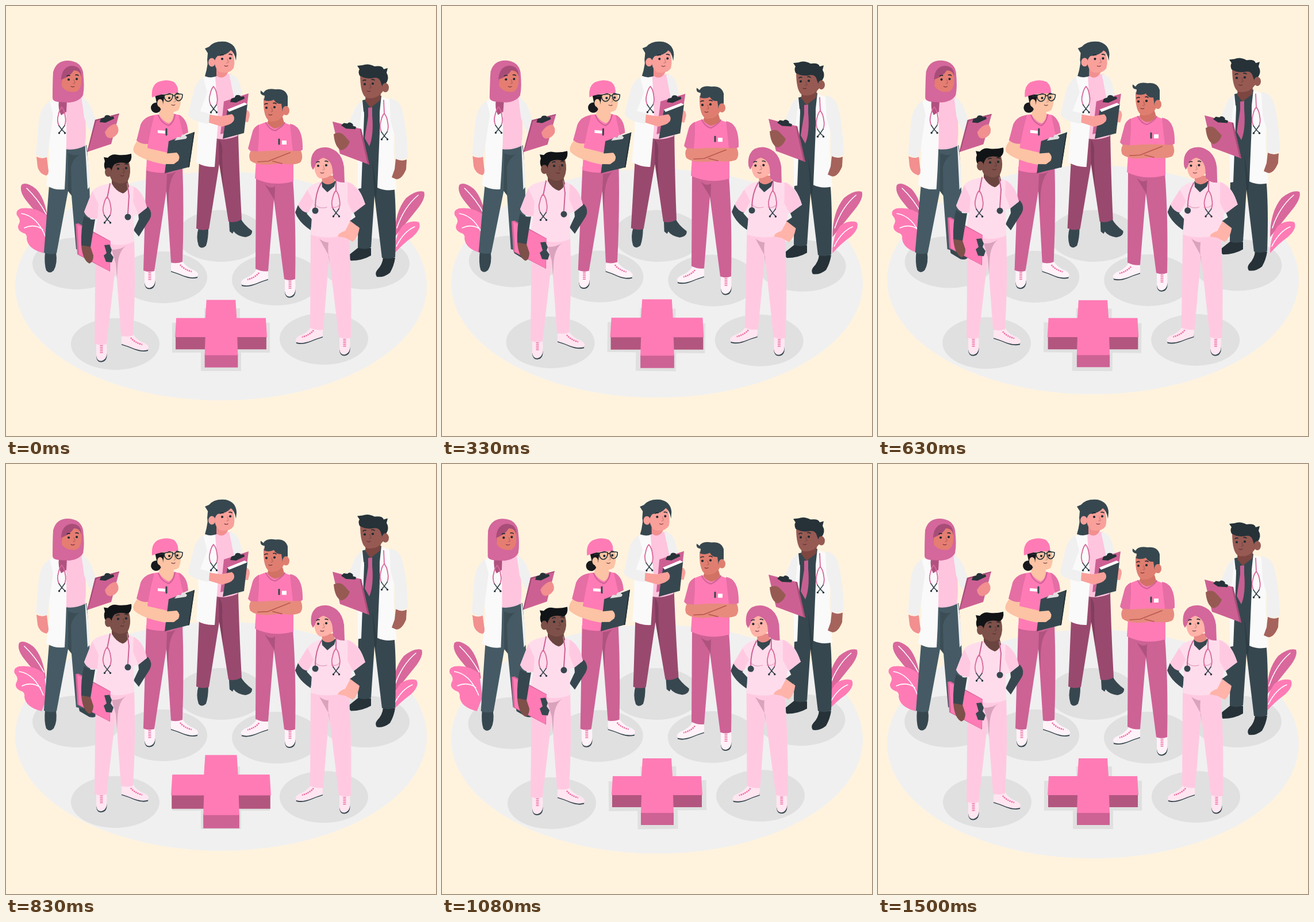
Animation of 748x748 px, one loop 1540 ms. Source, as an HTML page:

```html
<!DOCTYPE html>
<html lang="en">
<head>
<meta charset="utf-8">
<title>Medical team</title>
<style>
html, body { margin: 0; width: 100%; height: 100%; overflow: hidden; background: #fff3de; }
svg { display: block; width: 100vw; height: 100vh; }
.line { fill: none; stroke-linecap: round; stroke-linejoin: round; }
.shade { fill: #000; opacity: .15; }
</style>
</head>
<body>
<svg viewBox="0 0 748 748">
<defs>
  <g id="face">
    <g fill="#1f2a30"><circle cx="-7" r="2.1"/><circle cx="7" cy="-1" r="2.1"/></g>
    <path class="line" stroke="#1f2a30" stroke-width="1.6" d="M-10-6Q-8-8-5-7M5-8Q8-9 10-7"/>
    <path class="line" stroke="#000" stroke-opacity=".17" stroke-width="1.5" d="M2 0L4 6 1 7"/>
    <path class="line" stroke="#5b2530" stroke-width="1" d="M-3 12Q0 14 3 12"/>
  </g>
  <g id="shoeDown">
    <path fill="#37474f" d="M-8 20L9 19Q10 22 9 27Q7 34 0 34.5Q-8 35-9 25Z"/>
    <path d="M-9 0H9Q10 12 9 23Q7 31 0 32.5Q-8 33-9 23Z"/>
    <path fill="none" stroke="#ed6fa4" stroke-width="5" stroke-dasharray="1.5 1.5" d="M0 2V19"/>
  </g>
  <g id="shoeSide">
    <path fill="#37474f" d="M0 10V14.5Q12 18 22 22.5Q36 28 46 25L46.500 19Z"/>
    <path d="M0 0L20-4Q27 7 41 12Q50 17 46 23Q36 26 22 21Q10 16 0 13Z"/>
    <path fill="none" stroke="#ed6fa4" stroke-width="2.500" stroke-dasharray="2.5 1.2" d="M16 2Q22 10 36 14"/>
  </g>
  <path id="clip" fill="#263238" d="M-12 5L-10-1-4-3Q-3-8 3-7 7-6 6-4L12-5 13-1-2 6Z"/>
  <g id="scope" class="line">
    <path stroke="#d9689c" stroke-width="1.8" d="M-5 0Q-9-9-6-18Q-4-28 0-32Q5-26 6-16Q8-8 5 0"/>
    <path stroke="#37474f" stroke-width="1.6" d="M-5 0L0 7 5 0M0 7L-4 12M0 7L5 12"/>
    <g fill="#263238"><circle cx="-4.5" cy="13" r="1.7"/><circle cx="5.5" cy="13" r="1.7"/></g>
  </g>
</defs>

<rect width="748" height="748" fill="#fff3de"/>
<g data-move="float"><ellipse cx="374" cy="487" rx="358" ry="199" fill="#f0f0f0"/></g>

<g data-move="wind" data-pivot="374 495" fill="#e0e0e0">
  <g id="spots"></g>
  <path d="M345 526H407V551H459V603H409V635H339V603H289V551H345Z"/>
</g>

<g data-move="shake">
  <path fill="#d9689c" d="M73 372Q68 334 52 318Q35 305 27 311Q22 323 38 342Q52 360 70 376Z"/>
  <path fill="#ff7bb5" d="M70 364Q50 349 27 352Q16 355 19 364Q26 372 23 378Q16 390 33 396Q37 399 36 405Q38 423 66 430L76 405Z"/>
  <path class="line" stroke="#fff" stroke-width="1.6" d="M36 317Q56 336 70 362M27 361Q54 365 69 402M32 386Q50 378 64 389"/>
</g>
<g data-move="shake">
  <path fill="#d9689c" d="M676 402Q676 358 696 334Q714 319 727 323Q731 332 718 350Q702 370 676 402Z"/>
  <path fill="#ff7bb5" d="M676 430Q676 400 690 382Q704 372 718 376Q724 386 708 401Q690 414 676 430Z"/>
  <path class="line" stroke="#fff" stroke-width="1.6" d="M717 329Q692 350 680 386M711 384Q692 392 679 418"/>
</g>

<!-- doctor with headscarf -->
<g data-move="wind" data-pivot="125 280">
  <path fill="#37474f" d="M68 428L87 428Q90 448 83 460Q76 467 70 460Q66 448 68 428ZM126 420L147 418 160 434Q157 443 145 440L128 430Z"/>
  <path fill="#455a64" d="M102 247L140 242Q147 300 147 420Q134 427 122 423L114 330 108 322 88 430Q76 434 66 429L72 350 76 300Z"/>
  <path class="shade" d="M108 256Q120 262 128 258Q116 266 113 280L114 328 108 322Z"/>
  <path fill="#ffc4de" d="M98 158L134 158Q141 200 138 243Q120 252 103 249Z"/>
  <path fill="#f0f0f0" d="M131 158Q143 164 149 178L158 203 171 211 164 229Q150 224 143 212L136 194ZM137 232Q146 280 146 314L142 319Z"/>
  <path fill="#fafafa" d="M84 162Q72 166 68 180L76 260 70 312Q84 321 102 319Q106 250 105 190L96 162Z"/>
  <path fill="#f0f0f0" d="M76 166Q61 174 57 200L52 258Q60 266 72 263L77 225 82 190Z"/>
  <path fill="#f28f8f" d="M53 262Q62 267 71 263L73 280Q76 293 70 295Q58 292 55 280Z"/>
  <path fill="#b0527f" d="M92 164H106L105 184 96 190Q90 180 92 164Z"/>
  <path fill="#d4679b" d="M81 160Q81 130 82 115Q87 95 108 95Q130 96 134 115Q137 140 134 155Q128 166 110 168L92 167Q81 166 81 160Z"/>
  <path fill="#a84d78" d="M96 126Q98 105 115 104Q130 105 131 120L128 140H98Z"/>
  <path fill="#e57d72" d="M97 128Q112 122 118 112Q130 112 131 125Q132 145 122 149Q106 152 97 140Z"/>
  <use href="#face" x="116" y="128"/>
  <use href="#scope" x="97" y="208"/>
  <path fill="#cd6093" d="M155 198L197 187 183 240 141 254Z"/>
  <path fill="#a84d78" d="M155 198L197 187 196 189 157 200 143 253 141 254Z"/>
  <use href="#clip" x="175" y="197"/>
  <path fill="#f28f8f" d="M172 219Q180 206 191 205Q197 211 195 220Q190 229 181 230Q174 230 172 219Z"/>
</g>

<!-- doctor at the back -->
<g data-move="wind" data-pivot="374 240">
  <path fill="#37474f" d="M335 386L352 388Q352 405 348 417Q340 424 335 417Q330 402 335 386ZM388 374L408 369Q413 380 428 391Q429 400 416 402Q402 400 396 392L394 396 389 392Z"/>
  <path fill="#99496e" d="M336 270L366 226 404 224Q406 300 410 371Q399 378 387 375L371 275 353 388Q341 392 331 387Z"/>
  <path class="shade" d="M370 232Q378 240 376 262L378 318 371 275Z"/>
  <path fill="#ffc4de" d="M362 120L392 118 398 170 403 226Q380 235 364 230Z"/>
  <path fill="#f0f0f0" d="M388 118Q402 120 406 134L413 160 412 182 400 176Z"/>
  <path fill="#fafafa" d="M357 120Q336 124 332 138L335 215 331 272Q346 281 363 280L369 200 364 122Z"/>
  <path fill="#37474f" d="M352 76Q352 104 346 122Q358 127 368 121L372 90Z"/>
  <path fill="#f28f8f" d="M366 106H384L386 116Q378 130 366 121Z"/>
  <path fill="#f9a09a" d="M362 80Q372 70 392 74Q400 92 396 108Q388 119 372 115Q360 108 362 80Z"/>
  <path fill="#37474f" d="M350 94L351 82 346 74 353 71Q362 60 382 62Q400 66 401 84L400 95Q397 80 391 77Q384 86 368 87Q362 92 362 104L352 108Z"/>
  <ellipse cx="358" cy="98" rx="6" ry="7.500" fill="#f9a09a"/>
  <use href="#face" x="383" y="92"/>
  <use href="#scope" x="361" y="172"/>
  <path fill="#f0f0f0" d="M343 124Q330 132 326 150L317 188Q320 200 352 205L358 188 338 183 350 150Z"/>
  <path fill="#cd6093" d="M379 166L422 152 414 213 373 223Z"/>
  <use href="#clip" x="402" y="162"/>
  <path fill="#f9a09a" d="M354 189L375 192 394 190Q400 198 392 204L376 210 353 203ZM412 181Q424 178 424 190L421 202 411 201Z"/>
  <path fill="#37474f" d="M385 181L420 170 414 221 377 231Z"/>
  <path fill="#fff" d="M385 180L415 168 420 171 388 184Z"/>
  <path fill="#f9a09a" d="M373 192L393 188Q399 193 396 200Q390 208 376 209Z"/>
</g>

<!-- doctor with tie -->
<g data-move="float">
  <path fill="#263238" d="M613 420L635 421 635 434Q620 443 600 443Q594 438 598 432ZM656 437L677 438Q675 452 668 464Q657 473 645 471Q641 465 646 459Q655 450 656 437Z"/>
  <path fill="#37474f" d="M622 164L655 162 674 300Q680 350 677 437Q666 442 654 438L641 330 635 420Q623 425 612 420L613 300Z"/>
  <path class="shade" d="M637 268L645 318 643 345 641 330Z"/>
  <path fill="#fafafa" d="M622 166Q606 170 602 192L612 225 612 318 618 317 623 190Z"/>
  <path fill="#f0f0f0" d="M620 165Q608 171 604 186L596 204Q592 222 600 235L612 238 616 205Z"/>
  <path fill="#fafafa" d="M650 158Q668 160 678 172L674 250 679 319Q660 323 646 316L650 220Z"/>
  <path fill="#f0f0f0" d="M667 160Q684 163 689 180Q698 215 699 263Q687 271 676 266L676 225 669 200Z"/>
  <path fill="#a5635c" d="M678 266Q688 271 697 267L696 284Q688 303 678 301L671 298 676 284Z"/>
  <path fill="#37474f" d="M620 164L653 156 650 184 636 178 622 184Z"/>
  <path fill="#c85f92" d="M630 177L637 176 637 190Q640 225 632 244L624 230 630 192Z"/>
  <path fill="#7d4641" d="M626 150H652L651 164 634 177 625 165Z"/>
  <path fill="#965a53" d="M616 118Q632 108 656 120V148Q646 163 628 160Q616 156 616 118Z"/>
  <path fill="#263238" d="M615 121Q612 114 615 110L611 104 620 103Q630 99 641 105Q655 103 657 110L664 108 662 116Q668 126 660 136L655 142 651 130Q648 124 640 125Q626 128 615 121Z"/>
  <ellipse cx="660" cy="142" rx="6" ry="8" fill="#965a53"/>
  <use href="#face" x="631" y="136"/>
  <use href="#scope" x="658" y="219"/>
  <path class="line" stroke="#d9689c" stroke-width="1.8" d="M657 164L658 187"/>
  <path fill="#cd6093" d="M568 201L618 214 632 276 581 257Z"/>
  <path fill="#a84d78" d="M618 214L632 276 629 275 615 213Z"/>
  <use href="#clip" transform="translate(596 209) rotate(28)"/>
  <path fill="#965a53" d="M570 223Q581 217 589 226L598 236Q594 248 584 251Q572 247 570 223Z"/>
</g>

<!-- nurse with cap -->
<g data-move="wind" data-pivot="279 310">
  <use href="#shoeDown" x="250" y="458" fill="#fff2f8"/>
  <use href="#shoeSide" x="287" y="448" fill="#fff2f8"/>
  <path fill="#cd6295" d="M244 280L307 278Q310 360 307 445Q296 449 287 446L279 322 258 461Q247 464 239 460Z"/>
  <path class="shade" d="M280 292Q292 292 298 286Q284 298 283 330L282 360 279 322Z"/>
  <path fill="#ff7bb5" d="M262 189Q240 192 234 207L246 240 244 286Q276 296 308 282L308 224 316 220Q317 200 303 190L290 187Z"/>
  <path fill="#e56ea4" d="M258 190Q240 192 234 207L227 234Q235 242 247 240L252 214ZM300 189Q315 196 317 220L308 224Z"/>
  <path fill="#fcc3a4" d="M228 235Q236 241 247 240L245 247 284 256 297 255Q304 263 297 273L284 277Q240 270 224 256Q217 250 228 235Z"/>
  <path fill="#fcc3a4" d="M268 176H290L292 189Q290 202 283 204Q272 200 266 189Z"/>
  <path class="line" stroke="#cd6295" stroke-width="2" d="M265 190Q270 204 283 208Q292 203 294 189"/>
  <circle cx="261" cy="177" r="9" fill="#17191c"/>
  <path fill="#fcc3a4" d="M264 158Q280 148 303 153Q306 170 300 181Q288 188 272 182Q263 174 264 158Z"/>
  <path fill="#17191c" d="M259 154L276 154 273 171 263 173Z"/>
  <ellipse cx="268" cy="169" rx="5" ry="7" fill="#fcc3a4"/>
  <path fill="#ff7bb5" d="M254 159Q252 140 263 133Q279 126 292 132Q301 140 299 152Q276 150 254 159Z"/>
  <use href="#face" x="291" y="160"/>
  <path class="line" stroke="#263238" stroke-width="1.6" d="M267 157L276 156M275 155Q284 152 290 154 290 165 282 166 275 165 275 155ZM294 154Q302 152 307 154 307 164 300 165 294 164 294 154ZM290 156H294"/>
  <path fill="#fff" d="M264 216L277 217V222L264 221Z"/>
  <path class="line" stroke="#37474f" stroke-width="3" d="M279 214V224"/>
  <path fill="#37474f" d="M283 235L328 219 319 280 276 291Z"/>
  <path fill="#263238" d="M326 220L328 219 319 280 317 281Z"/>
  <path fill="#e0e0e0" d="M293 234L298 228 304 228Q306 222 311 224L315 228 313 231Z"/>
  <path fill="#fcc3a4" d="M274 257L297 255Q304 261 300 269L292 275 274 275Z"/>
</g>

<!-- nurse with folded arms -->
<g data-move="float">
  <use href="#shoeDown" x="494" y="473" fill="#fff2f8"/>
  <use href="#shoeSide" transform="translate(456 462) scale(-1 1)" fill="#fff2f8"/>
  <path fill="#cd6295" d="M435 300L499 300Q505 380 503 475Q493 479 484 475L466 336 456 461Q446 463 434 457Z"/>
  <path class="shade" d="M450 310Q462 320 468 313L467 345 466 336Z"/>
  <path fill="#ff7bb5" d="M454 202Q435 206 430 217L436 254 433 300Q465 315 500 305L500 256 506 211 484 203Z"/>
  <path fill="#e56ea4" d="M440 206Q431 211 429 218L421 248Q428 257 438 254L440 228ZM494 205Q517 208 516 250L506 256 499 252Z"/>
  <path class="line" stroke="#cd6295" stroke-width="2" d="M452 203Q458 215 468 217Q480 211 485 203"/>
  <path fill="#d17265" d="M458 190H480L484 203Q478 212 467 213Q456 208 455 203Z"/>
  <path fill="#df7e70" d="M448 161Q462 155 484 162V188Q476 202 460 201Q447 196 448 161Z"/>
  <path fill="#37474f" d="M449 164L450 156Q441 155 443 147L448 151Q452 142 469 145Q486 143 490 157L490 174 481 184 479 170Q470 171 466 163Q458 167 449 164Z"/>
  <ellipse cx="487" cy="182" rx="6" ry="8" fill="#df7e70"/>
  <use href="#face" x="460" y="177"/>
  <path fill="#fff" d="M480 234H488V241H480Z"/>
  <path class="line" stroke="#37474f" stroke-width="3" d="M475 232V240"/>
  <path fill="#e78b7d" d="M426 252L440 253Q470 250 498 252L513 252Q518 264 512 272Q500 278 480 274L458 276Q434 277 425 269Q421 260 426 252Z"/>
  <path class="line" stroke="#b9594f" stroke-width="1.6" d="M438 271L456 270 494 255M480 274L464 270"/>
</g>

<!-- cross -->
<g data-move="beat">
  <path fill="#b3567f" d="M296 574H452V597H296Z"/>
  <path fill="#cd6295" d="M346 605H403V628H346Z"/>
  <path fill="#ff7bb5" d="M349 512H399L401 543H451L453 576H402L403 607H346L347 576H295L297 543H347Z"/>
</g>

<!-- nurse front left -->
<g data-move="float">
  <use href="#shoeDown" x="166" y="585" fill="#ffe6f1"/>
  <use href="#shoeSide" x="201" y="575" fill="#ffe6f1"/>
  <path fill="#37474f" d="M230 360L247 349Q256 360 250 371L231 401 222 390 231 371Z"/>
  <path fill="#ffcae1" d="M156 405L223 405Q226 490 221 573Q210 577 200 573L191 448 175 588Q164 592 154 587Z"/>
  <path fill="#d9a3bd" d="M184 424Q199 424 209 417Q195 427 194 455L193 475 191 448Z"/>
  <path fill="#ffdcec" d="M181 309Q158 312 150 322L136 358Q142 372 159 370L153 404Q190 424 223 410L222 365 230 363 245 351Q238 326 224 315L210 309Z"/>
  <path fill="#ffcae1" d="M150 322L136 358Q142 372 159 370L161 345ZM222 314Q240 324 245 351L230 362 221 340Z"/>
  <path fill="#6a443f" d="M184 298H210L214 314Q210 324 203 326Q191 322 184 309Z"/>
  <path fill="#7d5049" d="M179 273Q196 264 214 272Q219 290 212 304Q200 314 184 303Q178 294 179 273Z"/>
  <path fill="#111416" d="M176 290Q168 280 172 270L170 263 177 264Q184 256 195 259Q207 260 218 257Q220 270 211 274Q198 270 189 275Q184 280 183 290Z"/>
  <ellipse cx="178" cy="289" rx="6" ry="8" fill="#7d5049"/>
  <use href="#face" x="202" y="283"/>
  <path class="line" stroke="#cd6295" stroke-width="2" d="M181 309L176 334M211 309L214 330 212 361"/>
  <use href="#scope" x="176" y="364"/>
  <circle cx="212" cy="367" r="5.5" fill="#37474f"/>
  <path fill="#d9689c" d="M121 379L126 378 182 409 181 462 124 432Z"/>
  <path fill="#ff7bb5" d="M124 380L182 410 180 461 127 432Z"/>
  <path fill="#37474f" d="M171 416L180 415 184 424 182 430 187 437 184 446 174 445 170 434 175 430Z"/>
  <path fill="#37474f" d="M136 365Q145 373 155 371L147 420 131 417Q130 385 136 365Z"/>
  <path fill="#7d5049" d="M131 416L147 419 152 434Q152 446 145 448Q133 442 131 416Z"/>
</g>

<!-- nurse front right -->
<g data-move="wind" data-pivot="567 425">
  <use href="#shoeDown" x="589" y="574" fill="#ffe6f1"/>
  <use href="#shoeSide" transform="translate(551 562) scale(-1 1)" fill="#ffe6f1"/>
  <path fill="#37474f" d="M508 346L526 358 523 361 533 372 530 390Q509 376 503 359Z"/>
  <path fill="#ffcae1" d="M530 392L596 392Q602 480 600 577Q590 580 579 576L562 435 552 563Q541 565 529 560Z"/>
  <path fill="#d9a3bd" d="M545 405Q555 412 561 411Q559 425 563 450L562 435Z"/>
  <path fill="#ffdcec" d="M546 306Q530 310 524 320L508 346Q514 358 525 360L533 350 530 398Q562 408 598 396L601 360 625 345Q616 315 598 307L575 304Z"/>
  <path fill="#ffcae1" d="M524 320L508 346Q514 358 525 360L535 340ZM594 306Q612 312 625 345L604 361 594 342Z"/>
  <path fill="#37474f" d="M549 305L574 304 571 314 559 324 550 315Z"/>
  <path fill="#e98a84" d="M549 295H570L572 305Q560 315 550 306Z"/>
  <path fill="#ffb3a9" d="M536 264Q550 256 570 266V290Q560 301 546 300Q534 294 536 264Z"/>
  <path fill="#d4679b" d="M531 279Q528 258 541 249Q556 242 570 250Q585 258 588 280L589 307Q576 308 569 299L568 284Q566 268 552 264Q541 267 537 280L534 285Z"/>
  <use href="#face" x="550" y="278"/>
  <path class="line" stroke="#e3a9c5" stroke-width="1.4" d="M537 345Q545 354 558 350M566 350Q575 352 580 346"/>
  <path class="line" stroke="#cd6295" stroke-width="2" d="M548 308Q538 326 538 350M574 304L574 322"/>
  <circle cx="538" cy="356" r="5.5" fill="#37474f"/>
  <use href="#scope" x="574" y="353"/>
  <path fill="#37474f" d="M605 360L625 345 631 359Q623 375 609 386L598 374 608 367Z"/>
  <path fill="#ffb3a9" d="M599 374L615 386Q612 404 603 410L590 403 577 401Q578 395 590 391Z"/>
</g>
</svg>

<script>
const LOOP = 1540, CYCLE = 1500, LAG = 45;
const spots = [[123, 448], [273, 472], [374, 400], [470, 476], [625, 448], [190, 588], [553, 579]];
document.getElementById('spots').innerHTML = spots
  .map(([x, y]) => `<ellipse cx="${x}" cy="${y}" rx="77" ry="45"/>`).join('');

const linear = u => u;
const smooth = u => u * u * (3 - 2 * u);

// Value at p (0..1) along evenly spaced keys.
function along(keys, p, ease = linear) {
  const x = p * (keys.length - 1);
  const i = Math.min(Math.floor(x), keys.length - 2);
  return keys[i] + (keys[i + 1] - keys[i]) * ease(x - i);
}

const float = p => along([0, -15, 0], p);
const wind = p => along([0, 1, 0, -1, 0], p);
const shake = p => 1.5 * along([0, -1, 2, -4, 4, -4, 4, -4, 2, -1, 0], p, smooth);

// Two pulses, then a rest.
function beat(t) {
  const pulse = start => Math.max(0, 1 - Math.abs(t - start - 210) / 210);
  return 1 + 0.1 * (pulse(-25) + pulse(620));
}

const rest = 1 - LAG / CYCLE;
const moves = {
  float: p => `translate(0 ${float(p) - float(rest)})`,
  shake: p => `translate(${shake(p) - shake(rest)} 0)`,
  wind: (p, t, pivot) => `rotate(${wind(p) - wind(rest)} ${pivot})`,
  beat: (p, t) => `translate(374 570) scale(${beat(t)}) translate(-374 -570)`
};
const parts = [...document.querySelectorAll('[data-move]')];

function draw(t) {
  const p = ((t - LAG + CYCLE) % CYCLE) / CYCLE;
  for (const el of parts) {
    const { move, pivot } = el.dataset;
    el.setAttribute('transform', moves[move](p, t, pivot));
  }
}

let start;
function tick(now) {
  start ??= now;
  draw((now - start) % LOOP);
  requestAnimationFrame(tick);
}
draw(0);
requestAnimationFrame(tick);
</script>
</body>
</html>
```
